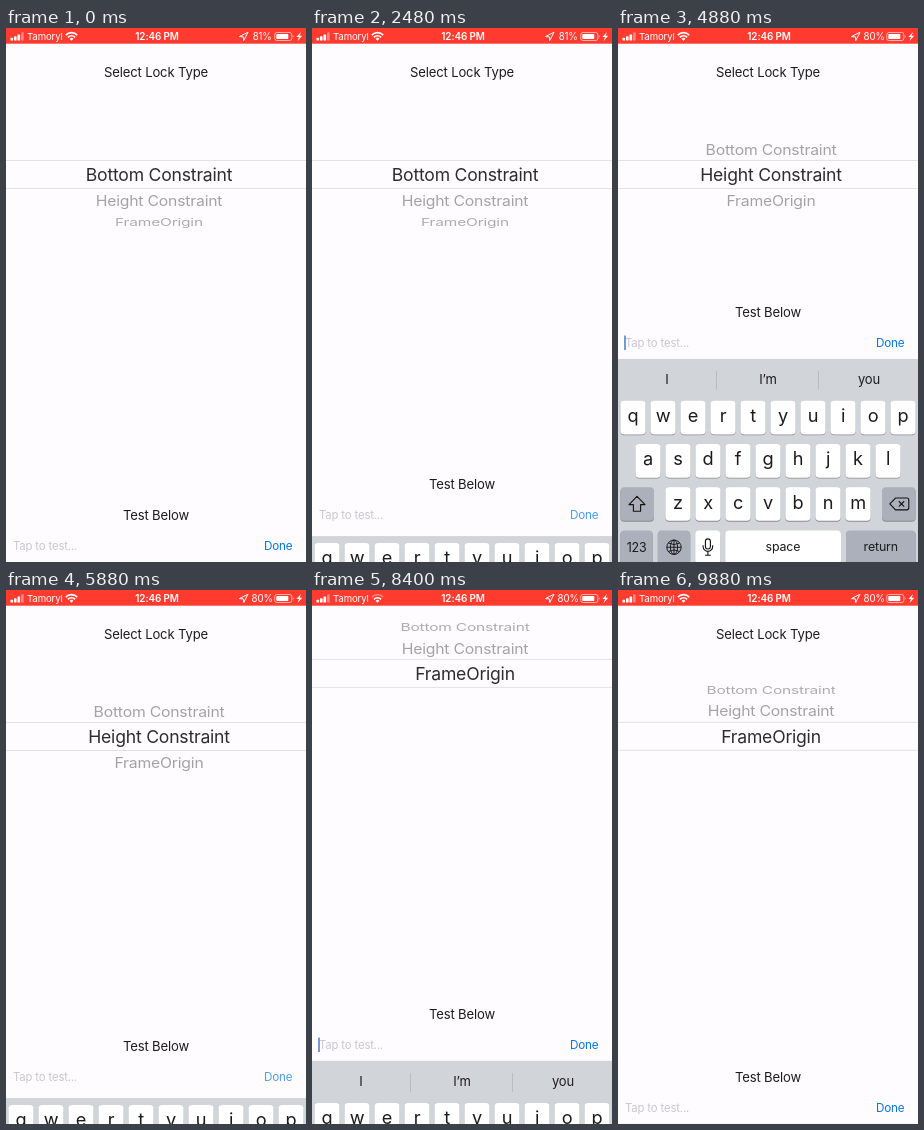
Animation of 300 by 534 pixels, one loop 9.92 s. Source, as an HTML page:

```html
<!DOCTYPE html>
<html lang="en">
<head>
<meta charset="utf-8">
<title>Keyboard lock demo</title>
<style>
html, body { margin: 0; width: 100%; height: 100%; overflow: hidden; background: #fefcfe; }
svg { display: block; width: 100vw; height: 100vh; }
text { font-family: Inter, "Liberation Sans", sans-serif; letter-spacing: -0.012em; white-space: pre; }
</style>
</head>
<body>
<svg id="stage" viewBox="0 0 300 534">
  <defs>
    <clipPath id="inside"><rect x="0" y="133" width="300" height="27"/></clipPath>
    <clipPath id="outside"><path d="M0 60H300V132H0ZM0 161H300V236H0Z"/></clipPath>
  </defs>
  <rect width="300" height="534" fill="#fefcfe"/>
  <g id="top">
    <path d="M0 132.5H300M0 160.5H300" stroke="#e3e2e6"/>
    <g id="outer" clip-path="url(#outside)"></g>
    <g id="inner" clip-path="url(#inside)"></g>
  </g>
  <g id="bottom"></g>
  <g id="keyboard"><g id="bar"></g></g>
  <g id="status">
    <rect width="300" height="15.7" fill="#ff3b30"/>
    <g fill="#fff">
      <rect x="4.5" y="9.8" width="2.6" height="2.7" rx=".6"/>
      <rect x="8" y="8.3" width="2.6" height="4.2" rx=".6"/>
      <rect x="11.5" y="6.4" width="2.6" height="6.1" rx=".6"/>
      <rect x="15" y="4.2" width="2.6" height="8.3" rx=".6" opacity=".4"/>
      <path d="M233.5 8.6L242 4.2L237.7 12.6L237.4 8.9Z" fill="none" stroke="#fff" stroke-linejoin="round"/>
      <rect x="268.8" y="4.5" width="17" height="8" rx="2" fill="none" stroke="#fff" stroke-opacity=".6"/>
      <rect x="270.3" y="6" width="12" height="5" rx=".8"/>
      <path d="M286.9 7.2q1.3 1.3 0 2.6z"/>
      <path d="M295 4L290.4 9H293L291.6 13L296.2 7.7H293.5Z"/>
    </g>
    <g fill="none" stroke="#fff" stroke-width="1.7">
      <path id="wifi" d="M59.8 7.1a8 8 0 0 1 11.4 0"/>
      <path d="M61.9 9.3a5 5 0 0 1 7.2 0"/>
      <path d="M63.6 10.7a2.8 2.8 0 0 1 3.8 0L65.5 12.7Z" fill="#fff" stroke="none"/>
    </g>
  </g>
</svg>
<script>
const LOOP = 9920, STEP = 40, KB = 208, BAR = 35;
const $ = id => document.getElementById(id);

function add(parent, tag, attrs, label) {
  const el = document.createElementNS("http://www.w3.org/2000/svg", tag);
  for (const k in attrs) el.setAttribute(k, attrs[k]);
  if (label) el.textContent = label;
  parent.appendChild(el);
  return el;
}
const text = (parent, label, x, y, size, extra) =>
  add(parent, "text", { x, y, "font-size": size, fill: "#1c1c1e", "text-anchor": "middle", ...extra }, label);

// Status bar, title and input row
const left = { "text-anchor": "start" }, white = { fill: "#fff" };
text($("status"), "Tamoryl", 21, 12, 9.6, { ...left, ...white });
text($("status"), "12:46 PM", 151, 12, 9.9, { ...white, "font-weight": 600 });
const percent = text($("status"), "81%", 256.2, 12, 9.7, white);
text($("top"), "Select Lock Type", 150, 49.2, 13.1);
text($("bottom"), "Test Below", 150, 492.2, 13.1);
text($("bottom"), "Tap to test...", 7, 522.2, 11.3, { ...left, fill: "#c7c7cc" });
const done = text($("bottom"), "Done", 272.2, 522.4, 11.7, { fill: "#0874e2" });
const caret = add($("bottom"), "rect", { x: 6.3, y: 510.7, width: 1.4, height: 14.5, fill: "#3c6fc9" });

// Picker rows, drawn once magnified and once plain
const rows = ["Bottom Constraint", "Height Constraint", "FrameOrigin"].map(label => ({
  big: text($("inner"), label, 0, 6.4, 17.6, { fill: "#2c2c2e" }),
  small: text($("outer"), label, 0, 6.4, 17.6)
}));

// Keyboard, with the top edge of its suggestion bar at y = 0
const kb = $("keyboard"), bar = $("bar");
add(bar, "rect", { width: 300, height: BAR + 1, fill: "#d1d4d9" });
add(bar, "path", { d: "M98.5 12V31M200.5 12V31", stroke: "#b8bcc3" });
["I", "I’m", "you"].forEach((w, i) => text(bar, w, 49 + 101 * i, 25.5, 13));
add(kb, "rect", { y: BAR, width: 300, height: KB - BAR + 2, fill: "#d1d4d9" });

function key(x, row, width, dark) {
  const y = 42 + 43.2 * row;
  const box = { x, width, height: 33.6, rx: 4 };
  add(kb, "rect", { ...box, y: y + 0.9, fill: "#888b90" });
  add(kb, "rect", { ...box, y, fill: dark ? "#abb0ba" : "#fff" });
  return y;
}
["qwertyuiop", "asdfghjkl", "zxcvbnm"].forEach((line, row) => {
  [...line].forEach((c, i) => {
    const x = [15, 30, 60][row] + 30 * i;
    text(kb, c, x, key(x - 12.6, row, 25.2) + 21.4, 18.2);
  });
});
key(2.4, 2, 33.6, true);
key(264, 2, 33.6, true);
key(2.4, 3, 32.4, true);
key(39.8, 3, 32.4, true);
key(77.2, 3, 25.2);
key(107.2, 3, 115.8);
key(228, 3, 69.6, true);
text(kb, "123", 18.6, 192.8, 12.4);
text(kb, "space", 165, 192.4, 12.4);
text(kb, "return", 262.8, 192.4, 12.4);

const icon = { fill: "none", stroke: "#111", "stroke-width": 1.1, "stroke-linejoin": "round" };
add(kb, "path", { ...icon, d: "M19 137.5l8 8.3h-4.4v6.6h-7.2v-6.6h-4.4z" });
add(kb, "path", { ...icon, d: "M277.5 139.2h11.3a2 2 0 0 1 2 2v7.8a2 2 0 0 1-2 2h-11.3l-5.7-5.9zM280.8 142.4l5.4 5.4m0-5.4l-5.4 5.4" });
add(kb, "path", { ...icon, "stroke-width": 0.9, d: "M48.8 188.4h14.4M56 181.2v14.4M50.3 184.2q5.7 3 11.4 0M50.3 192.6q5.7-3 11.4 0" });
for (const rx of [7.2, 3.6]) add(kb, "ellipse", { ...icon, "stroke-width": 0.9, cx: 56, cy: 188.4, rx, ry: 7.2 });
add(kb, "rect", { ...icon, x: 87.4, y: 180, width: 5, height: 10.2, rx: 2.5 });
add(kb, "path", { ...icon, d: "M85.1 186.5v1.2a4.8 4.8 0 0 0 9.6 0v-1.2M89.9 192.6v3.6M87 196.4h5.8" });

// Each round: first visible frame, slide up start, touch on Done, slide down start
const rounds = [
  { show: 1200, up: 1155, tap: 2200, down: 2290 },
  { show: 4600, up: 4550, tap: 5600, down: 5690 },
  { show: 8400, up: 8330, tap: 9320, down: 9420 }
];
const clamp = v => Math.max(0, Math.min(1, v));
const smooth = v => { v = clamp(v); return v * v * (3 - 2 * v); };

// cubic-bezier(.38, .7, .125, 1)
function slide(v) {
  v = clamp(v);
  let lo = 0, hi = 1;
  for (let i = 0; i < 24; i++) {
    const s = (lo + hi) / 2, r = 1 - s;
    if (1.14 * s * r * r + 0.375 * s * s * r + s ** 3 < v) lo = s; else hi = s;
  }
  const r = 1 - lo;
  return 2.1 * lo * r * r + 3 * lo * lo * r + lo ** 3;
}

function place(el, y, sx, sy) {
  el.setAttribute("transform", `translate(153 ${y.toFixed(2)}) scale(${sx.toFixed(4)} ${sy.toFixed(4)})`);
}

function drawPicker(pos) {
  rows.forEach(({ big, small }, i) => {
    const a = (i - pos) * 0.398, c = Math.cos(a), y = 65.8 * Math.sin(a);
    const k = 0.899 - 0.06 * (1 - c);
    place(big, 146.9 + y * 1.12, 1, c);
    place(small, 146.9 + y, k, k * c);
    const g = Math.round(160 + 40 * (1 - c));
    small.setAttribute("fill", `rgb(${g},${g},${g + 1})`);
  });
}

function draw(t) {
  let open = 0, closing = false, blink = 0, alpha = 1;
  for (const r of rounds) {
    if (t < r.show) continue;
    closing = t >= r.down;
    open = slide((t - r.up) / 500) - slide((t - r.down) / 500);
    blink = t < r.tap ? 1 - smooth((t - r.show - 540) / 190) : 0;
    alpha = t < r.tap ? 1 : 0.2 + 0.8 * clamp((t - r.down) / 300);
  }
  const lift = KB * open;
  const pos = smooth((t - 3120) / 480) + smooth((t - 6840) / 440);
  drawPicker(pos);
  const move = (id, y) => $(id).setAttribute("transform", `translate(0 ${y.toFixed(2)})`);
  move("top", pos > 1.5 ? -lift : 0);
  move("bottom", -lift);
  // The suggestion bar is dropped before the keys slide away
  move("keyboard", 534 - (closing ? BAR + (KB - BAR) * open : lift));
  bar.setAttribute("visibility", closing ? "hidden" : "visible");
  caret.setAttribute("opacity", blink);
  done.setAttribute("opacity", alpha);
  percent.textContent = t < 3160 ? "81%" : "80%";
  const weak = (t >= 3160 && t < 4120) || (t >= 6880 && t < 9320);
  $("wifi").setAttribute("opacity", weak ? 0.35 : 1);
}

function tick() {
  const t = performance.now() % LOOP;
  draw(Math.floor(t / STEP) * STEP);
  requestAnimationFrame(tick);
}
tick();
</script>
</body>
</html>
```
